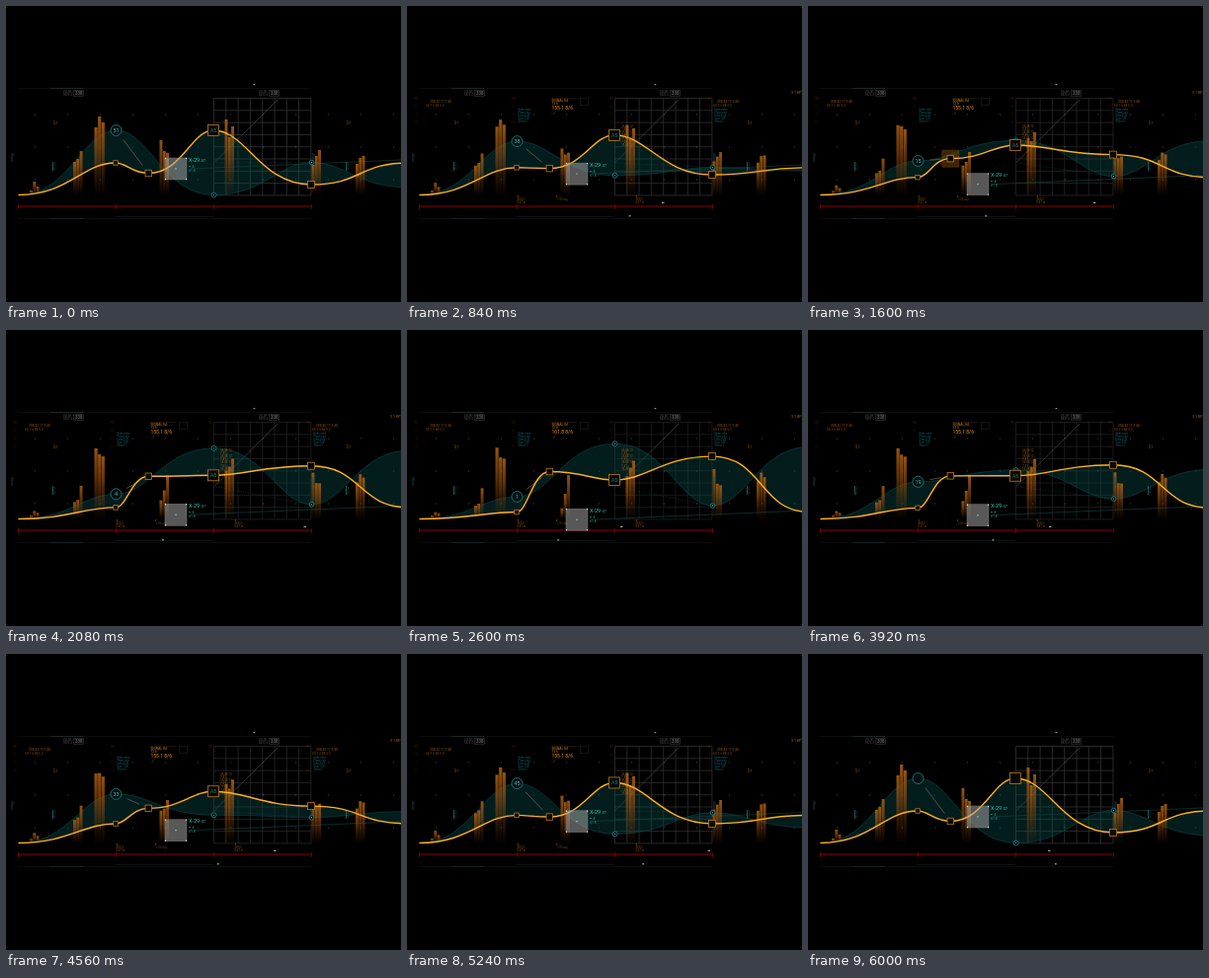
An HTML page for the animation above (6040 ms loop, 400 px wide and 300 px high).

```html
<!DOCTYPE html>
<html lang="en">
<head>
<meta charset="utf-8">
<title>Signal chart</title>
<style>
html, body { margin: 0; width: 100%; height: 100%; overflow: hidden; background: #000; }
svg { display: block; width: 100vw; height: 100vh; }
text { font-family: "Roboto", "Liberation Sans", sans-serif; }
</style>
</head>
<body>
<svg id="stage" viewBox="0 0 400 300">
  <defs>
    <linearGradient id="barFill" x1="0" y1="0" x2="0" y2="1">
      <stop offset="0" stop-color="#b06414" stop-opacity=".85"/>
      <stop offset=".4" stop-color="#964e0c" stop-opacity=".65"/>
      <stop offset="1" stop-color="#6a3406" stop-opacity=".04"/>
    </linearGradient>
  </defs>
</svg>
<script>
const LOOP = 6040;
const COL = 99;
const TEAL = '#1f8585', ORANGE = '#b86c10', YELLOW = '#ffb01e';
const stage = document.getElementById('stage');

function set(el, attrs) {
  for (const key in attrs) el.setAttribute(key, attrs[key]);
  return el;
}
function add(tag, attrs, parent = stage) {
  const el = document.createElementNS('http://www.w3.org/2000/svg', tag);
  return parent.appendChild(set(el, attrs));
}
function line(x1, y1, x2, y2, stroke, width, parent) {
  return add('line', { x1, y1, x2, y2, stroke, 'stroke-width': width }, parent);
}
function label(x, y, text, size, fill, parent, opacity = 1) {
  const el = add('text', { x, y, 'font-size': size, fill, opacity }, parent);
  el.textContent = text;
  return el;
}

// Frame lines and dot field
line(12, 83.5, 309, 83.5, '#0c0c0c', 1);
line(45, 83.5, 78, 83.5, '#1c2828', 1);
line(12, 215.5, 309, 215.5, '#0b0b0b', 1);
line(45, 215.5, 78, 215.5, '#142222', 1);
line(111, 213.5, 210, 213.5, '#0a1414', 1);
for (let x = 29.5; x < 400; x += 33) {
  for (let y = 110; y < 190; y += 33) {
    add('rect', { x: x - .6, y: y - .6, width: 1.2, height: 1.2, fill: '#2a3c3c' });
  }
}

// Grid panel
const grid = add('g', {});
for (let i = 0; i <= 8; i++) {
  const d = i * 12.3;
  line(210.5 + d, 93.5, 210.5 + d, 191.9, '#fff', .8, grid);
  line(210.5, 93.5 + d, 308.9, 93.5 + d, '#fff', .8, grid);
}
line(210.5, 159, 275, 95, '#484848', .7);

// Band between the two curves
const band = add('path', { fill: '#0a5052', 'fill-opacity': .36 });
const tealCurve = add('path', { fill: 'none', stroke: '#0f4548', 'stroke-width': .6 });
const guide = line(186, 0, 400, 0, '#123f3d', .7);
const level = line(213, 159, 306, 0, '#174648', .6);
set(level, { 'stroke-dasharray': '1 1.5' });

// Bars: left edge, width, then [top at rest, top at full swing]
const bars = [
  [24, 3.3, [187, 188], [178, 185], [183, 186]],
  [68, 3.3, [158, 179], [155, 177], [147, 161]],
  [89.5, 3.6, [123, 119], [112, 130], [118, 131]],
  [155.5, 3.3, [136, 183], [147, 167], [149, 147]],
  [221.5, 3.3, [115, 150], [133, 140], [122, 133]],
  [309.5, 3.3, [161, 140], [152, 156], [146, 158]],
  [354, 3.3, [160, 153], [154, 144], [152, 149]]
].flatMap(([x, w, ...tops]) => tops.map(([from, to], i) => ({
  from, to,
  el: add('rect', { x: x + i * w, width: w - .4, fill: 'url(#barFill)' })
})));

// Base rule
line(12, 203, 309, 203, '#820609', 1.2);
line(12, 204.5, 309, 204.5, '#200203', .8);
for (let i = 0; i < 4; i++) line(12.5 + COL * i, 201, 12.5 + COL * i, 206, '#78080c', .8);

// Header tags
for (const x of [58, 256]) {
  label(x, 88, 'LVL M', 2.8, '#555');
  label(x, 91, 'RATE 4', 2.8, '#4a4a4a');
  add('rect', { x: x + 10.5, y: 85.5, width: 10, height: 6, fill: '#0c0c0c', stroke: '#333', 'stroke-width': .6 });
  label(x + 12, 90.4, '338', 4.5, '#777');
}

// Small marks that stay on
for (const x of [48, 345]) {
  label(x, 117, '▪', 3, ORANGE, stage, .9);
  label(x, 120, '4.7', 3, ORANGE, stage, .9);
  line(x - .5, 158, x - .5, 167, TEAL, .7);
  label(x + .5, 162, '2', 3, TEAL, stage, .8);
  label(x + .5, 166, '6', 3, TEAL, stage, .8);
}
for (const x of [6, 311]) {
  line(x, 149, x, 158, '#14505a', .8);
  label(x + .5, 153, '1', 3, '#14505a');
}

// Readouts that fade in and out
const hud = add('g', {});
for (let i = 0; i < 4; i++) {
  const x = 7 + COL * i;
  for (let j = 0; j < 4; j++) label(x, 94.5 + j * 8, (90 - j * 10) + '', 3, '#7c1212', hud, j ? .45 : .9);
}
for (const x of [19, 310]) {
  label(x + 4, 97.5, '208.42  17.3  40', 3.3, ORANGE, hud, .8);
  label(x, 102, '60.1   ▾ 84   5.2', 3.3, ORANGE, hud, .7);
}
label(389, 89, '3.1 KP', 3.6, ORANGE, hud);
for (const x of [112.5, 311.5]) {
  ['Node value', 'Phase rate', 'Delta 0.42', 'Gain 1.08', 'Offset 3'].forEach((t, i) =>
    label(x, 106 + i * 2.9, t, 2.6, '#1c7a86', hud, .8));
}
label(146.5, 97.3, 'SIGNAL 04', 3.4, '#d8841a', hud);
label(146.5, 100.3, '12.6', 3.2, '#d8841a', hud);
const total = label(146.5, 105.3, '', 5, '#e8901c', hud);
label(146.5, 110, '▪ 8', 3, ORANGE, hud, .6);
add('rect', { x: 175.5, y: 93.5, width: 8, height: 7, fill: 'none', stroke: '#222', 'stroke-width': .6 }, hud);
line(146, 93.5, 172, 93.5, '#332008', .6, hud);
for (let i = 0; i < 7; i++) {
  label(217, 123 + i * 3.1, i % 2 ? '7.41 ▪' : '36.08 12', 3, ORANGE, hud, .8);
}
for (const x of [111.5, 231.5]) {
  label(x, 194, '▾', 3, ORANGE, hud);
  label(x, 197.3, 'SEG 2', 2.8, ORANGE, hud, .75);
  label(x, 200, '0.47 m', 2.8, ORANGE, hud, .75);
}
label(151, 194, '▾', 3, ORANGE, hud);
label(152, 197.3, '2.06 avg', 2.8, ORANGE, hud, .6);

// Curve, nodes and probe
const link = line(0, 0, 0, 0, '#6a6a6a', .7);
const halo = add('rect', { width: 17, height: 17, fill: '#7a4808', stroke: ORANGE, 'stroke-width': .6 });
const curve = add('path', { fill: 'none', stroke: YELLOW, 'stroke-width': 1.4 });

const rings = [[111.5, 5.5], [210.5, 2.5], [309.5, 2.3]].map(([cx, r]) =>
  add('circle', { cx, r, fill: '#031112', stroke: '#258486', 'stroke-width': .8 }));
const cores = [210.5, 309.5].map(cx => add('circle', { cx, r: .6, fill: '#5cb8b8' }));
const squares = [[111, 4.5], [144.3, 6.5], [210, 11], [309, 7]].map(([x, size]) => ({
  size,
  el: add('rect', {
    x: x - size / 2, width: size, height: size,
    fill: '#080602', stroke: '#b87a1c', 'stroke-width': .8
  })
}));
const ringText = label(111.5, 0, '', 5.5, '#58bcb4');
set(ringText, { 'text-anchor': 'middle' });
const boxText = label(210, 0, 'A5', 5, '#2f9a98');
set(boxText, { 'text-anchor': 'middle' });

const probe = add('g', {});
add('rect', { x: -11, y: -11, width: 22, height: 22, fill: '#aaa', 'fill-opacity': .52, stroke: '#777', 'stroke-width': .5 }, probe);
for (const x of [-10.5, 0, 10.5]) {
  for (const y of [-10.5, 0, 10.5]) {
    const mid = !x && !y;
    if (mid || (x && y)) add('circle', { cx: x, cy: y, r: .7, fill: mid ? '#8ff0e0' : '#ddd' }, probe);
  }
}
label(13, -7.5, 'X-29', 5.6, '#36c4ae', probe);
label(25, -7.5, '.07', 3.6, '#36c4ae', probe);
label(13, -1.5, '▪▪ 4', 3.6, '#2ea592', probe);
label(13, 2.5, '61.8', 3.4, '#2ea592', probe);

// Small travelling markers
add('rect', { x: 250.5, y: 79, width: 1.8, height: 1.2, fill: '#7a9a98' });
const runner = add('rect', { y: 198.8, width: 2.4, height: 1.1, fill: '#bbb' });
const walker = add('rect', { y: 212, width: 1.8, height: 1.5, fill: '#7a9a98' });

const clamp = v => Math.max(0, Math.min(1, v));
const sine = p => (1 - Math.cos(Math.PI * p)) / 2;
const mix = (a, b, p) => a + (b - a) * p;

function track(keys, t) {
  let i = 1;
  while (i < keys.length - 1 && keys[i][0] < t) i++;
  const [t0, a] = keys[i - 1], [t1, b] = keys[i];
  return mix(a, b, (t - t0) / (t1 - t0));
}
const runKeys = [[0, 36], [840, 49], [1600, 80], [2600, 106], [3920, 134], [4560, 161], [LOOP, 234]];

// Level tangents at every point; the third value is the handle's share of the span
const SHORT = .34, LONG = .52;
function steps(points, start = 'M') {
  return points.map(([x, y, h], i) => {
    if (!i) return start + x + ' ' + y;
    const [px, py, ph] = points[i - 1], span = x - px;
    return `C${px + span * ph} ${py} ${x - span * h} ${y} ${x} ${y}`;
  }).join('');
}

function draw(t) {
  const s = sine(2 * t / LOOP);
  const PEAK = 2480;
  const k = t < PEAK ? sine(t / PEAK) : 1 - sine((t - PEAK) / (LOOP - PEAK));

  const y = [mix(159, 185.8, s), mix(169.5, 142.3, s), mix(126, 153.3, s), mix(181, 125.5, s)];
  const c = [mix(126, 169, k), mix(191.5, 115, k), mix(158.5, 178, k)];
  const top = [
    [12.5, 191.5, LONG], [111, y[0], SHORT], [144.3, y[1], LONG],
    [210, y[2], SHORT], [309, y[3], LONG], [408, y[0], LONG]
  ];
  const low = [
    [12.5, 191.5, LONG], [111.5, c[0], SHORT], [210.5, c[1], LONG],
    [309.5, c[2], SHORT], [408, mix(184, 118, k), LONG]
  ];

  set(curve, { d: steps(top) });
  set(tealCurve, { d: steps(low) });
  set(band, { d: steps(top) + steps(low.slice().reverse(), 'L') + 'Z' });

  squares.forEach((q, i) => set(q.el, { y: y[i] - q.size / 2 }));
  rings.forEach((r, i) => set(r, { cy: c[i] }));
  cores.forEach((r, i) => set(r, { cy: c[i + 1] }));
  bars.forEach(b => {
    const v = mix(b.from, b.to, s);
    set(b.el, { y: v, height: 191 - v });
  });

  const dx = 32.8, dy = y[1] - c[0], len = Math.hypot(dx, dy);
  const a = 12 / len, b = 1 - 10 / len;
  set(link, { x1: 111.5 + dx * a, y1: c[0] + dy * a, x2: 111.5 + dx * b, y2: c[0] + dy * b });

  const py = mix(165, 193.5, s);
  set(probe, { transform: `translate(172 ${py})` });
  set(guide, { y1: py, y2: py - 9 });
  set(level, { y2: c[2] });
  set(grid, { opacity: mix(.2, .11, s) });

  const shown = clamp((t - 150) / 400) * clamp((5750 - t) / 400);
  set(hud, { opacity: shown });
  total.textContent = (155.1 - 100 * clamp((s - .9) * 10)).toFixed(1) + ' 8/6';

  ringText.textContent = Math.round(mix(51, 1, k));
  set(ringText, { y: c[0] + 2, opacity: t < 5900 ? 1 : 0 });
  set(boxText, { y: y[2] + 1.8, opacity: t < 5900 ? .8 : 0 });

  const pulse = clamp(1 - Math.abs(t - 1600) / 300);
  set(halo, { x: 135.8, y: y[1] - 8.5, opacity: pulse * .5 });

  const moving = t > 300 ? 1 : 0;
  set(runner, { x: 209 + track(runKeys, t) % COL, opacity: moving });
  set(walker, { x: mix(250, 152, k), opacity: moving });
}

const begin = performance.now();
function tick() {
  draw((performance.now() - begin) % LOOP);
  requestAnimationFrame(tick);
}
tick();
</script>
</body>
</html>
```
